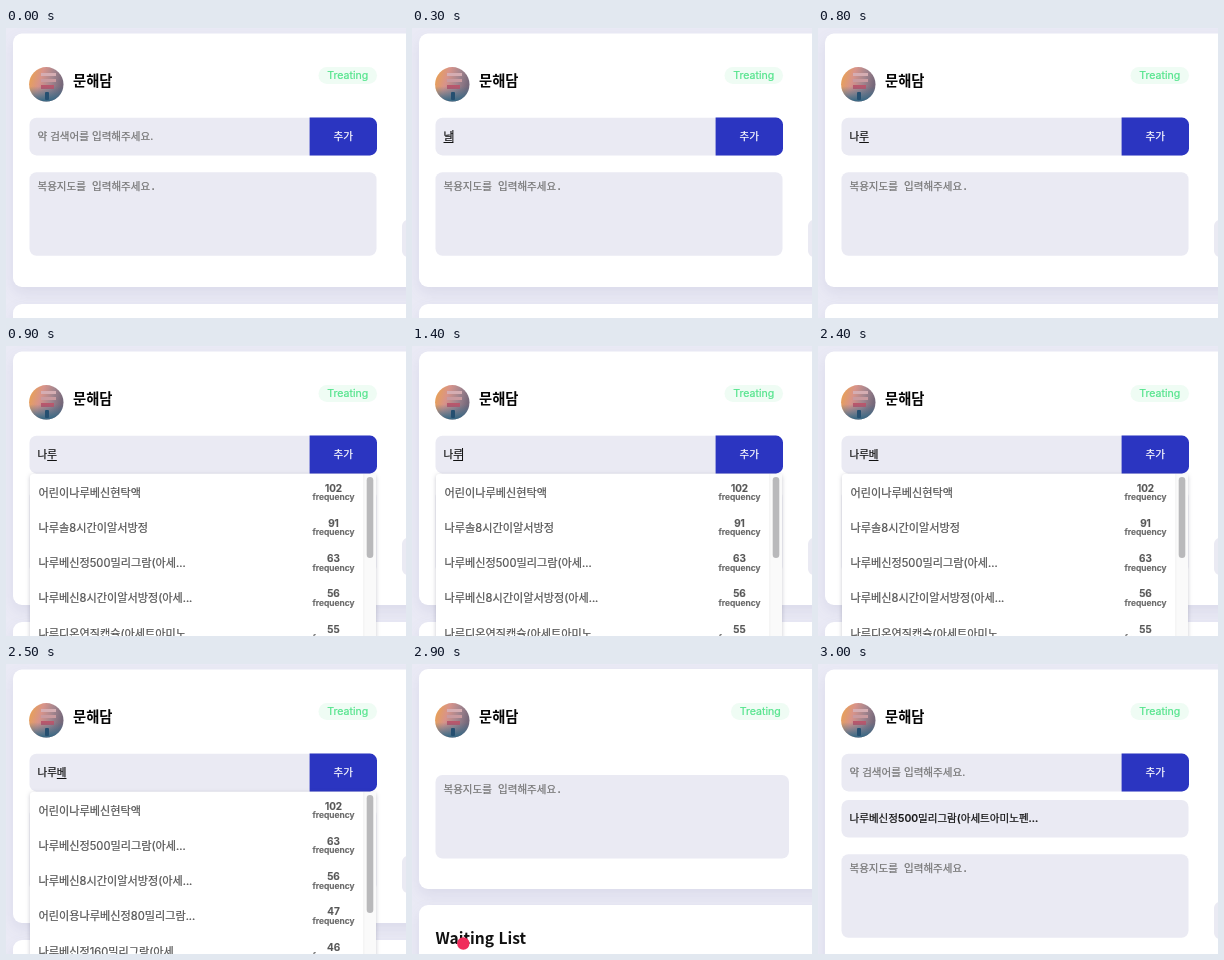
Animation, 400 px wide and 290 px high, one loop 3400 ms. Source, as an HTML page:

```html
<!DOCTYPE html>
<html lang="ko">
<head>
<meta charset="utf-8">
<title>약 검색</title>
<style>
  html, body { margin: 0; width: 100%; height: 100%; overflow: hidden; background: #eaeaf5; }
  svg { display: block; width: 400px; height: 290px; }
  text { font-family: Inter, "Noto Sans CJK KR", "Noto Sans CJK JP", sans-serif; white-space: pre; }
  .title { font-family: "Noto Sans CJK KR", "Noto Sans CJK JP", sans-serif; font-weight: 700; stroke: none; }
  .mono { font-family: "DejaVu Sans Mono", "Noto Sans CJK KR", "Noto Sans CJK JP", monospace; }
  .card { filter: drop-shadow(0 6px 7px rgba(70, 70, 130, .09)); }
  .menu { filter: drop-shadow(0 1px 2px rgba(40, 40, 70, .25)); }
</style>
</head>
<body>
<svg id="stage" viewBox="0 0 400 290"></svg>
<script>
const LOOP = 3400;
const FIELD = '#eaeaf3';
const INK = '#111';
const HINT = '#757575';
const stage = document.getElementById('stage');

// Syllables as the input method composes them
const typing = [[0, ''], [100, 'ㄴ'], [200, '나'], [300, '날'], [400, '나루'],
                [1700, '나룹'], [1800, '나루베'], [3000, '']];
const menus = [
  [900, 81, [['어린이나루베신현탁액', 102], ['나루솔8시간이알서방정', 91],
    ['나루베신정500밀리그람(아세...', 63], ['나루베신8시간이알서방정(아세...', 56],
    ['나루디온연질캡슐(아세트아미노', 55]]],
  [2500, 118, [['어린이나루베신현탁액', 102], ['나루베신정500밀리그람(아세...', 63],
    ['나루베신8시간이알서방정(아세...', 56], ['어린이용나루베신정80밀리그람...', 47],
    ['나루베신정160밀리그람(아세', 46]]],
];

const latest = (steps, t) => steps.filter(([start]) => t >= start).pop();
const rect = (x, y, w, h, r, fill, extra = '') =>
  `<rect x="${x}" y="${y}" width="${w}" height="${h}" rx="${r}" fill="${fill}" ${extra}/>`;
// A hairline stroke gives the type a slightly heavier weight
const text = (x, y, size, fill, content, extra = '') =>
  `<text x="${x}" y="${y}" font-size="${size}" fill="${fill}" stroke="${fill}" stroke-width=".22" ${extra}>${content}</text>`;
const card = (y, h) => rect(7, y, 420, h, 9, '#fff', 'class="card"');

const avatar = `
  <defs>
    <linearGradient id="dusk" x2="1" y2=".3">
      <stop offset="0" stop-color="#eda546"/><stop offset=".4" stop-color="#d8938a"/>
      <stop offset=".7" stop-color="#a5868f"/><stop offset="1" stop-color="#76687a"/>
    </linearGradient>
    <linearGradient id="street" x2="0" y2="1">
      <stop offset=".55" stop-color="#397693" stop-opacity="0"/><stop offset="1" stop-color="#306582"/>
    </linearGradient>
    <clipPath id="round"><circle cx="40.3" cy="56.3" r="17.2"/></clipPath>
  </defs>
  <g clip-path="url(#round)">
    ${rect(23, 39, 35, 35, 0, 'url(#dusk)')}
    ${rect(35, 45, 15, 3, 0, '#d5adb2')}
    ${rect(35, 51, 15, 3, 0, '#c99a9f')}
    ${rect(35, 57, 13, 4, 0, '#b9576c')}
    ${rect(23, 39, 35, 35, 0, 'url(#street)')}
    ${rect(39, 64, 4, 8, 1, '#254f70')}
  </g>`;

function header(pillX) {
  return avatar + text(67, 58.3, 14.3, '#050505', '문해담', 'class="title"') +
    rect(pillX, 39, 58.5, 17, 8.5, '#effcf4') +
    text(pillX + 8.7, 51.4, 10.6, '#55e48d', 'Treating');
}

function notes(y, width) {
  return rect(23.5, y, width, 83.5, 7, FIELD) +
    text(31.5, y + 18, 10.5, HINT, '복용지도를 입력해주세요.', 'class="mono"');
}

function searchBar(t) {
  const typed = latest(typing, t)[1];
  const advance = 9.66;
  const end = 31.5 + typed.length * advance;
  const caretOn = typed && (t < 800 || (t >= 1400 && t < 2400));
  return rect(23.5, 89.7, 347, 37.7, 7, FIELD) +
    '<path d="M303.6 89.6H364a7 7 0 0 1 7 7V120.4a7 7 0 0 1-7 7H303.6z" fill="#2b35c1"/>' +
    text(337.3, 112, 10.6, '#fff', '추가', 'text-anchor="middle" font-weight="500"') +
    (typed
      ? text(31.5, 112, 10.5, INK, typed, 'font-weight="500"') +
        rect(end - advance, 114, advance, 1, 0, INK)
      : text(31.5, 112, 10.55, HINT, '약 검색어를 입력해주세요.')) +
    (caretOn ? rect(end - .8, 102, 1, 13, 0, INK) : '');
}

function menu([, thumb, rows]) {
  const items = rows.map(([name, count], i) => {
    const y = 150.5 + i * 35.25;
    const centred = 'text-anchor="middle" font-weight="600"';
    return text(32.5, y, 11.15, '#555', name) +
      text(327.5, y - 5, 10.1, '#555', count, centred) +
      text(327.5, y + 3.7, 8.5, '#666', 'frequency', centred);
  }).join('');
  return rect(24, 128, 346, 180, 3, '#fff', 'class="menu"') +
    rect(358, 128, 12, 180, 0, '#fafafa') + rect(357.5, 128, .7, 180, 0, '#ececec') +
    rect(360.7, 131, 6.6, thumb, 3.3, '#b9b9bb') + items;
}

function scene(t) {
  if (t >= 2900 && t < 3000) {
    return card(5, 220) + card(241, 80) + header(319) + notes(111, 353.5) +
      text(23.5, 280, 15.6, '#111', 'Waiting List', 'class="title"') +
      '<circle cx="51.3" cy="279.5" r="6.2" fill="#f02c5b"/>';
  }
  const picked = t >= 3000;
  const shift = picked ? 46 : 0;
  const open = !picked && latest(menus, t);
  return card(5.5, 253.5 + shift) + card(276 + shift, 80) + header(312.5) +
    rect(396, 192 + shift, 20, 37, 6, FIELD) + notes(144.3 + shift, 347) + searchBar(t) +
    (picked
      ? rect(23.5, 136, 347, 37.5, 7, FIELD) +
        text(31.5, 158.3, 10.55, INK, '나루베신정500밀리그람(아세트아미노펜...', 'font-weight="500"')
      : '') +
    (open ? menu(open) : '');
}

let shown = '';
function draw() {
  const markup = scene(performance.now() % LOOP);
  if (markup !== shown) stage.innerHTML = shown = markup;
  requestAnimationFrame(draw);
}
draw();
</script>
</body>
</html>
```
